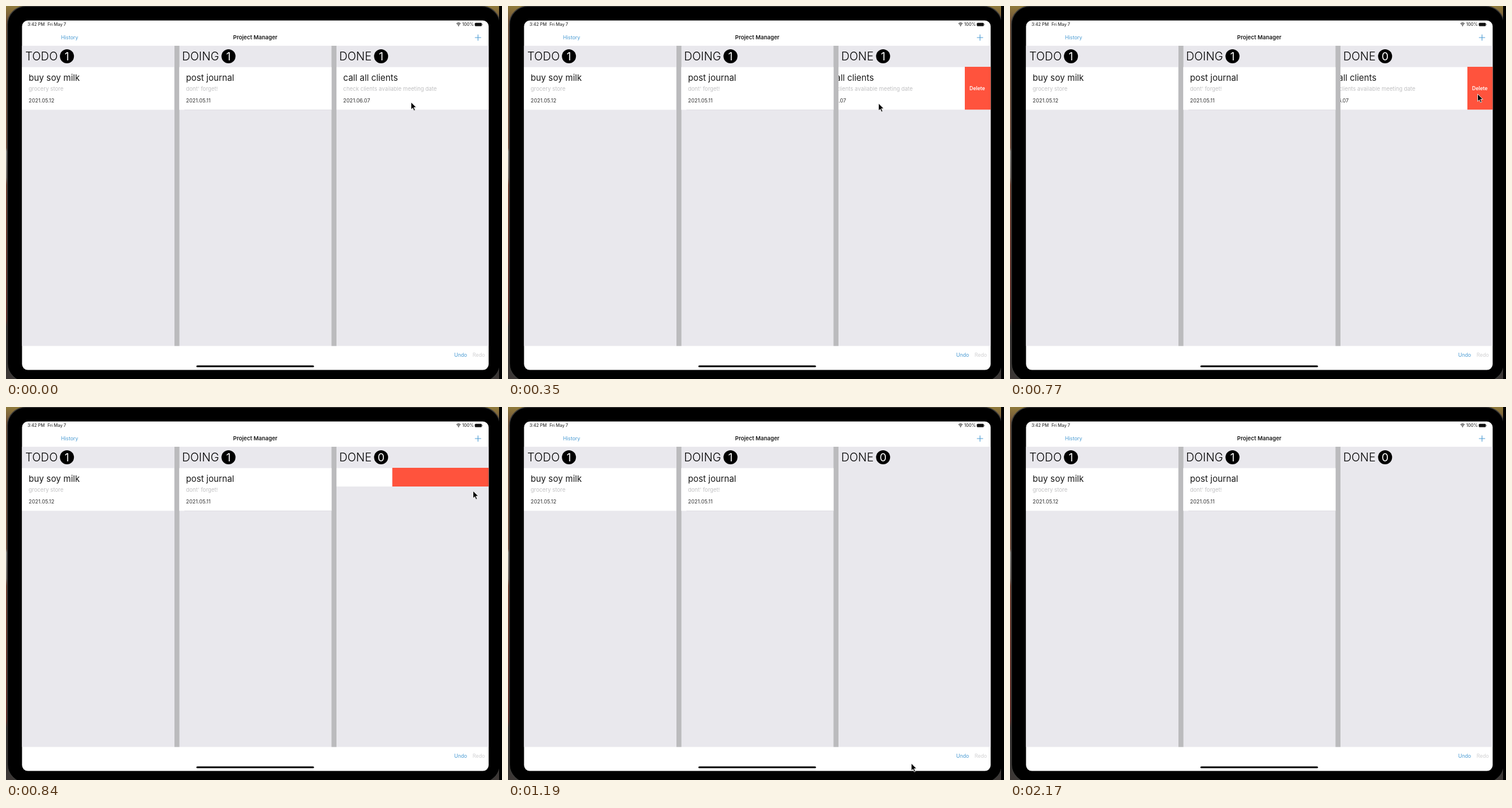
Write an HTML page that moves like this. It is 848 by 638 pixels and loops after 3010 ms.

```html
<!DOCTYPE html>
<html lang="en">
<head>
<meta charset="utf-8">
<title>Task board</title>
<style>
  html, body { margin: 0; width: 100%; height: 100%; overflow: hidden; background: #000; }
  svg { display: block; width: 100%; height: 100%; font-family: Inter, "Liberation Sans", sans-serif; }
  .head { font-size: 19.5px; font-weight: 300; fill: #000; }
  .badge { font-size: 19px; font-weight: 400; fill: #fff; text-anchor: middle; }
  .name { font-size: 14.8px; fill: #1a1a1a; }
  .note { font-size: 9.35px; fill: #c0c0c2; }
  .date { font-size: 8.9px; fill: #333; }
  .status { font-size: 7.3px; font-weight: 500; fill: #333; }
  .title { font-size: 9.5px; font-weight: 600; fill: #1a1a1a; text-anchor: middle; }
  .link { font-size: 8.7px; fill: #4a9bd3; }
  .off { fill: #d0d0d2; }
  .delete { font-size: 8.5px; font-weight: 600; fill: #fff; text-anchor: middle; }
</style>
</head>
<body>
<svg viewBox="0 0 848 638" preserveAspectRatio="none">
  <defs>
    <linearGradient id="desk" x1="0" y1="0" x2="0" y2="1">
      <stop offset="0" stop-color="#8f7a3a"/>
      <stop offset=".04" stop-color="#70523a"/>
      <stop offset=".38" stop-color="#7a5442"/>
      <stop offset=".39" stop-color="#8b8a86"/>
      <stop offset=".46" stop-color="#7d736c"/>
      <stop offset=".48" stop-color="#75402f"/>
      <stop offset=".84" stop-color="#642a24"/>
      <stop offset=".86" stop-color="#33302f"/>
      <stop offset="1" stop-color="#3d3836"/>
    </linearGradient>
    <clipPath id="view"><rect width="843" height="638"/></clipPath>
    <clipPath id="screen"><rect x="27.4" y="24.8" width="797.8" height="597.8" rx="10"/></clipPath>
    <clipPath id="rowClip"><rect id="rowBox" x="565" y="104" width="260.5" height="73.5"/></clipPath>
  </defs>

  <g clip-path="url(#view)">
    <rect width="848" height="638" fill="url(#desk)"/>
    <rect x="2.5" y=".5" width="842" height="642" rx="31" fill="#000" stroke="#3c3b39" stroke-width="1.6"/>
  </g>

  <g clip-path="url(#screen)">
    <rect x="27" y="24" width="799" height="600" fill="#fff"/>
    <rect x="27" y="68" width="799" height="513.5" fill="#e9e8ed"/>
    <path d="M288 68h8.5v513.5h-8.5zM556.5 68h8.5v513.5h-8.5z" fill="#bbbbbd"/>
    <g id="board"></g>
    <g id="row" clip-path="url(#rowClip)">
      <g id="card"></g>
      <rect id="red" y="104" width="270" height="73.5" fill="#ff533d"/>
      <text id="del" class="delete" y="143.7">Delete</text>
    </g>
    <text class="status" x="36.7" y="34.3">3:42 PM</text>
    <text class="status" x="71" y="34.3">Fri May 7</text>
    <text class="status" x="780" y="34.3">100%</text>
    <g fill="none" stroke="#222" stroke-width="1.1">
      <path d="M770.2 30.4q3.5-3.2 7 0M771.6 32q2.1-1.9 4.2 0"/>
      <circle cx="773.7" cy="33.5" r=".4"/>
    </g>
    <rect x="801.5" y="28.7" width="12" height="5.8" rx="1.6" fill="#111"/>
    <rect x="814.2" y="30.5" width="1" height="2.2" rx=".5" fill="#888"/>
    <text class="title" x="426.2" y="57">Project Manager</text>
    <text class="link" x="94" y="57">History</text>
    <path d="M801.7 54h10.6M807 48.7v10.6" stroke="#4a9bd3" stroke-width="1.1"/>
    <text class="link" x="766.2" y="599.8">Undo</text>
    <text class="link off" x="797.7" y="599.8">Redo</text>
    <rect x="325.5" y="614.8" width="201" height="3" rx="1.5" fill="#000"/>
  </g>

  <g id="cursor">
    <path transform="translate(.5 .6) scale(.92)" d="M0 0V13.6L3.2 10.7 5.4 15.8 7.7 14.8 5.5 9.8H9.8Z" fill="#000" stroke="#fff" stroke-width=".9"/>
  </g>
</svg>
<script>
const LOOP = 3010, STEP = 70;
const $ = id => document.getElementById(id);

const card = (x, name, note, date) => `
  <rect x="${x}" y="104.5" width="260.4" height="73" fill="#fff"/>
  <text class="name" x="${x + 11.6}" y="127.8">${name}</text>
  <text class="note" x="${x + 11.6}" y="145.3">${note}</text>
  <text class="date" x="${x + 11.6}" y="164.8">${date}</text>`;

const header = (x, label, cx, id) => `
  <text class="head" x="${x}" y="93">${label}</text>
  <circle cx="${cx}" cy="85.9" r="12" fill="#000"/>
  <text class="badge" id="${id}" x="${cx}" y="92.7">1</text>`;

$('board').innerHTML =
  header(33, 'TODO', 104.2, 'todo') +
  header(301, 'DOING', 380.4, 'doing') +
  header(569.8, 'DONE', 641.3, 'done') +
  card(27.2, 'buy soy milk', 'grocery store', '2021.05.12') +
  card(296.2, 'post journal', "dont' forget!", '2021.05.11') +
  '<path d="M305 177.8H556" stroke="#d4d4d8" stroke-width=".6"/>';
$('card').innerHTML = card(565, 'call all clients', 'check clients available meeting date', '2021.06.07');

// Keys are [time, ...values]
const pointer = [
  [0, 692, 164], [70, 689, 164], [210, 651, 165], [350, 633, 166], [420, 650, 165],
  [560, 767, 154], [630, 796, 151], [770, 799, 150], [840, 798, 143], [910, 795, 126],
  [1050, 755, 345], [1120, 715, 520], [1190, 689, 609], [1330, 640, 400],
  [1470, 588, 170], [1540, 585, 122], [1610, 594, 108]
];
const swipe = [[70, 0], [210, 34], [350, 44.5], [700, 44.5], [770, 43.5], [840, 165], [910, 257.5]];
const height = [[770, 73.5], [840, 32], [910, 1.4]];
const fade = [[1820, 1], [1890, .5], [1960, 0]];

function at(keys, t) {
  const i = keys.findIndex(k => k[0] > t);
  if (i === 0) return keys[0].slice(1);
  if (i < 0) return keys[keys.length - 1].slice(1);
  const a = keys[i - 1], b = keys[i], p = (t - a[0]) / (b[0] - a[0]);
  return a.slice(1).map((v, n) => v + (b[n + 1] - v) * p);
}

function draw(time) {
  const t = Math.floor(time % LOOP / STEP) * STEP;
  const [dx] = at(swipe, t), edge = 825.5 - dx;
  const [x, y] = at(pointer, t);
  $('row').style.display = t > 910 ? 'none' : '';
  $('rowBox').setAttribute('height', at(height, t)[0]);
  $('card').setAttribute('transform', `translate(${-dx})`);
  $('red').setAttribute('x', edge);
  $('del').setAttribute('x', edge + 21.3);
  $('done').textContent = t < 770 ? 1 : 0;
  $('cursor').setAttribute('transform', `translate(${x} ${y})`);
  $('cursor').setAttribute('opacity', at(fade, t)[0]);
}

const start = performance.now();
function tick() {
  draw(performance.now() - start);
  requestAnimationFrame(tick);
}
tick();
</script>
</body>
</html>
```
